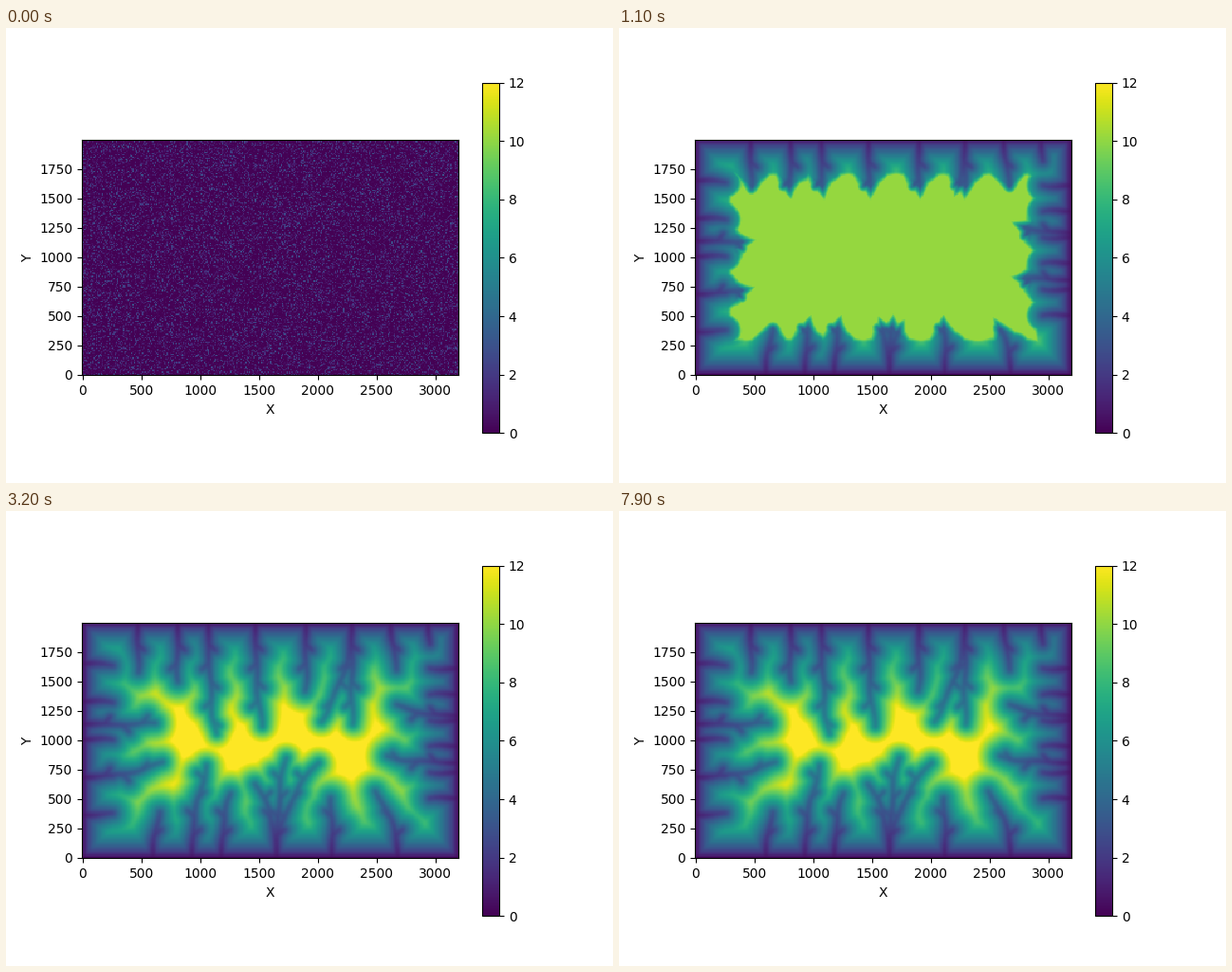
A matplotlib script for the animation above (8 s loop, 640 px wide and 480 px high).

```python
import numpy as np
import matplotlib.pyplot as plt
from matplotlib.animation import FuncAnimation

NX, NY, STEP = 320, 200, 10
FRAMES, INTERVAL = 80, 100
UPLIFT = 0.92                   # plateau rise per step
HEADWARD, SIDEWARD = 37, 25     # erosion speeds in cells per second

# Main rivers per border: outlet, reach inland, sideways lean of the head
RIVERS = {
    "top": [(47, 42), (81, 50), (107, 95, 6), (147, 88, 5), (190, 58),
            (229, 87), (229, 84, -27), (262, 40, 6), (294, 18)],
    "bottom": [(60, 38, 5), (93, 78, 13), (118, 55, 8), (165, 84, 7),
               (165, 62, -17), (165, 80, 35), (212, 50), (268, 57, -19)],
    "left": [(113, 62), (68, 69, 12)],
    "right": [(120, 52, 8), (80, 60, 5)],
}
# Short gullies at regular gaps on the two narrow borders
RIVERS["left"] += [(y, 26) for y in range(36, 180, 32)]
RIVERS["right"] += [(y, 24) for y in range(50, 165, 22)]

yy, xx = np.mgrid[0:NY, 0:NX].astype(np.float32)
inset = np.minimum(np.minimum(xx, NX - 1 - xx), np.minimum(yy, NY - 1 - yy))


def place(side, along, depth):
    """Turn a position along a border and a depth inland into x, y."""
    return {"top": (along, NY - 1 - depth), "bottom": (along, depth),
            "left": (depth, along), "right": (NX - 1 - depth, along)}[side]


def river(side, outlet, reach, lean=0):
    """Points x, y, length from the outlet, for a trunk and its side arms."""
    def trunk(depth):
        u = depth / reach
        wander = 1.5 * u * np.sin(depth / 7 + outlet)
        return outlet + lean * u ** 2 + wander, u * np.hypot(reach, lean)

    depth = np.arange(0, reach + 1, 2.0)
    along, run = trunk(depth)
    parts = [(*place(side, along, depth), run)]
    arm = np.arange(0, 10, 2.0)
    for i, start in enumerate(range(18, reach - 8, 16)):
        along, run = trunk(start)
        turn = 0.7 * (-1) ** i
        parts.append((*place(side, along + turn * arm, start + 0.7 * arm),
                      run + arm))
    return np.hstack(parts)


def blur(a, times):
    for _ in range(times):
        p = np.pad(a, 1, mode="edge")
        a = sum(p[i:i + NY, j:j + NX] for i in range(3) for j in range(3)) / 9
    return a


def erode():
    """Final relief, and the time at which erosion reaches each cell."""
    slope = 0.75 + 0.0065 * inset
    relief = slope * inset ** 0.65
    arrival = inset / SIDEWARD
    points = np.hstack([river(side, *r) for side in RIVERS
                        for r in RIVERS[side]])
    for x, y, run in points.T.astype(np.float32):
        d = np.hypot(xx - x, yy - y)
        relief = np.minimum(relief, 0.12 * run ** 0.78 + slope * d ** 0.65)
        arrival = np.minimum(arrival, run / HEADWARD + d / SIDEWARD)
    return blur(relief, 2), arrival


relief, arrival = erode()
noise = 3 * np.random.default_rng(4).random((NY, NX)) ** 6


def height(n):
    t = n * INTERVAL / 1000
    settle = 1 + 0.08 * np.exp(-max(t - 1.6, 0) / 1.5)
    carved = relief * settle + 20 * np.maximum(arrival - t, 0)
    return np.minimum(UPLIFT * n, carved) + noise * np.exp(-1.2 * n)


fig, ax = plt.subplots(figsize=(6.4, 4.8), dpi=100)
half = STEP / 2
image = ax.imshow(height(0), origin="lower", vmin=0, vmax=12, cmap="viridis",
                  extent=(-half, NX * STEP - half, -half, NY * STEP - half),
                  interpolation="nearest")
ax.set_xlabel("X")
ax.set_ylabel("Y")
fig.colorbar(image)


def update(n):
    image.set_data(height(n))
    return [image]


anim = FuncAnimation(fig, update, frames=FRAMES, interval=INTERVAL,
                     repeat=True, repeat_delay=0)
plt.show()
```
